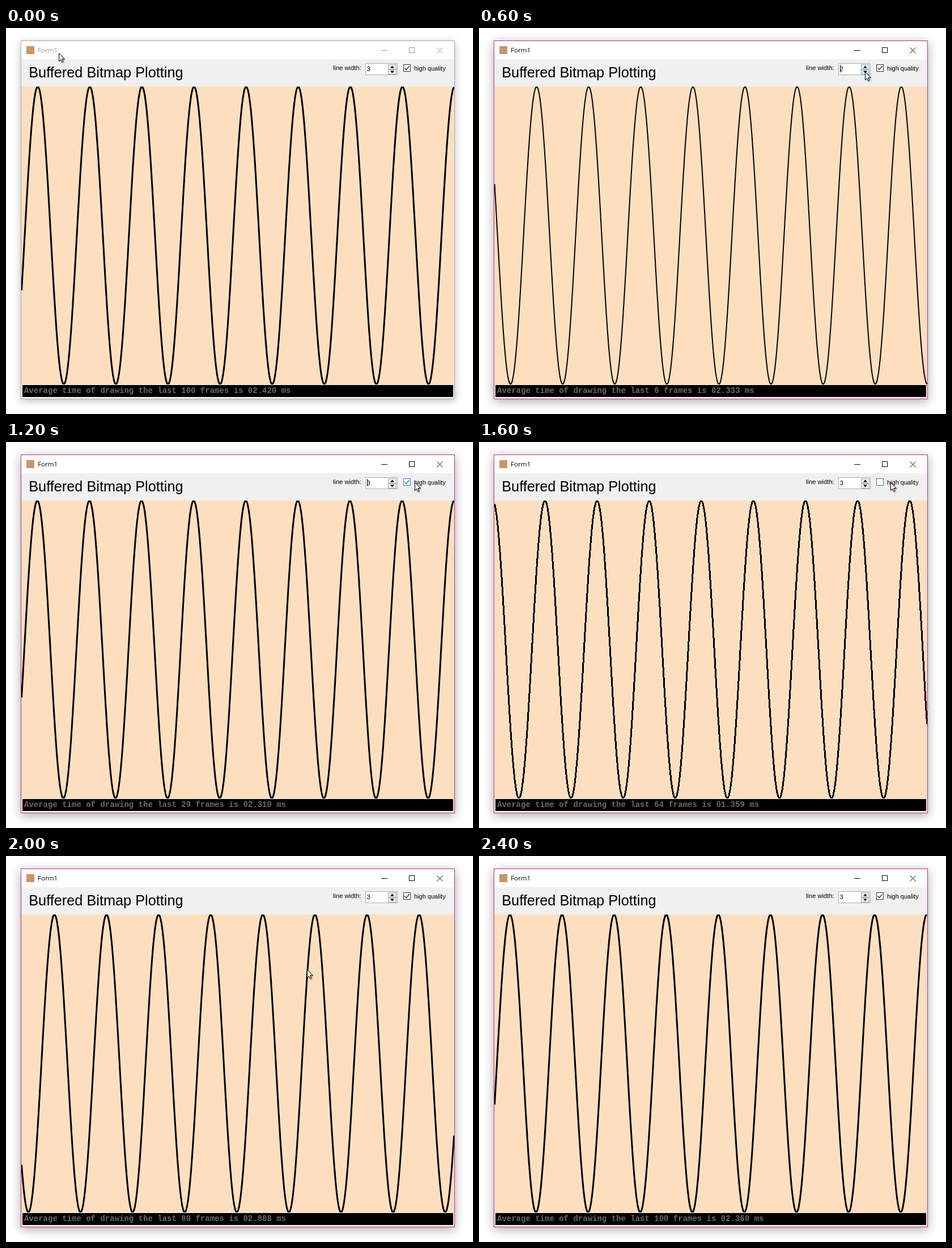
Write an HTML page with a canvas that moves like this. It is 824 px wide and 680 px high and loops after 2.5 s.

```html
<!DOCTYPE html>
<html lang="en">
<head>
<meta charset="utf-8">
<title>Buffered Bitmap Plotting</title>
<style>
html, body { margin: 0; width: 824px; height: 680px; overflow: hidden; background: #fff; }
canvas { display: block; }
</style>
</head>
<body>
<canvas id="stage" width="824" height="680"></canvas>
<script>
const ctx = document.getElementById('stage').getContext('2d');
const STEP = 100, STEPS = 25;
const PLOT = { x: 27, y: 103, w: 764, h: 525 };
const PERIOD = 91.93, SPEED = 7.72, FIRST_PEAK = 56, MID = 365.5, AMP = 262;
const SANS = '"Liberation Sans", Arial, sans-serif';

// Settings in force from a given step; n counts drawn frames, ms is their average time.
const phases = [
  { from: 0, width: 3, smooth: true, n: 100, ms: 2.42, drift: 0.01 },
  { from: 6, width: 2, smooth: true, n: 6, ms: 2.333, drift: 0 },
  { from: 7, width: 1, smooth: true, n: 10, ms: 2.2, drift: 0.012 },
  { from: 9, width: 2, smooth: true, n: 8, ms: 2.25, drift: 0.02 },
  { from: 11, width: 3, smooth: true, n: 4, ms: 2.25, drift: 0.06 },
  { from: 14, width: 3, smooth: false, n: 14, ms: 1.429, drift: -0.035 },
  { from: 17, width: 3, smooth: true, n: 5, ms: 3.284, drift: -0.132 }
];
const RATE = 25;

// Pointer path: step, x, y
const path = [
  [0, 93, 44], [2, 408, 247], [5, 674, 84], [6, 681, 77], [8, 681, 77],
  [9, 682, 67], [11, 682, 67], [12, 721, 71], [16, 726, 71], [17, 726, 71],
  [20, 531, 200], [21, 470, 240]
];

function rect(x, y, w, h, fill, edge) {
  ctx.fillStyle = fill;
  ctx.fillRect(x, y, w, h);
  if (edge) {
    ctx.strokeStyle = edge;
    ctx.lineWidth = 1;
    ctx.strokeRect(x + 0.5, y + 0.5, w - 1, h - 1);
  }
}

function text(str, x, y, font, color) {
  ctx.font = font;
  ctx.fillStyle = color;
  ctx.fillText(str, x, y);
}

function trace(points, close) {
  ctx.beginPath();
  points.forEach(([x, y]) => ctx.lineTo(x, y));
  if (close) ctx.closePath();
}

function line(points, color, width = 1) {
  trace(points);
  ctx.strokeStyle = color;
  ctx.lineWidth = width;
  ctx.stroke();
}

function drawWindow(active) {
  ctx.save();
  ctx.shadowColor = active ? 'rgba(0,0,0,.34)' : 'rgba(0,0,0,.26)';
  ctx.shadowBlur = active ? 17 : 13;
  ctx.shadowOffsetY = active ? 4 : 3;
  rect(26, 22, 766, 632, '#fff');
  ctx.restore();
  rect(26, 22, 766, 632, '#fff', active ? '#cb2a85' : '#aaa');
  rect(27, 55, 764, 598, '#f0f0f0');

  const ink = active ? '#000' : '#999';
  rect(36, 32, 14, 14, '#c99468');
  text('Form1', 56, 43, '11.6px "Open Sans", "Noto Sans", sans-serif', ink);
  rect(662, 39, 11, 1, ink);
  ctx.strokeStyle = ink;
  ctx.strokeRect(711.5, 34.5, 9, 9);
  line([[760.5, 34.5], [770.5, 44.5]], ink);
  line([[770.5, 34.5], [760.5, 44.5]], ink);
}

function drawSpinButton(y, dir, hot) {
  rect(674, y, 15, 9, hot ? '#cfe6fa' : '#ededed', hot ? '#7eb4ea' : '#acacac');
  const mid = y + 4.5;
  trace([[678, mid + 2 * dir], [685, mid + 2 * dir], [681.5, mid - 2 * dir]], true);
  ctx.fillStyle = '#000';
  ctx.fill();
}

function drawControls(step, phase) {
  text('Buffered Bitmap Plotting', 40.2, 87, '25.3px ' + SANS, '#000');
  text('line width:', 577, 74, '11.2px ' + SANS, '#000');
  rect(634, 62, 57, 21, '#fff', '#abadb3');
  text(phase.width, 636.5, 75.5, '11.2px ' + SANS, '#000');
  if (step >= 6 && step <= 12) rect(637, 65, 1, 13, '#000');
  drawSpinButton(64, 1, step >= 9 && step <= 11);
  drawSpinButton(73, -1, step >= 6 && step <= 8);

  const box = step >= 12 && step <= 17 ? '#2a7fce' : '#333';
  rect(701, 64, 13, 13, '#fff', box);
  if (phase.smooth) line([[703.3, 70.3], [706.3, 73.5], [711.7, 67.3]], box, 1.3);
  text('high quality', 720, 75, '11px ' + SANS, '#000');
}

function drawWave(step, phase) {
  const peak = FIRST_PEAK - SPEED * step;
  const wave = x => MID - AMP * Math.cos(2 * Math.PI * (x - peak) / PERIOD);
  const points = [];
  for (let x = PLOT.x; x < PLOT.x + PLOT.w; x++) points.push([x + 0.5, wave(x + 0.5)]);

  ctx.save();
  ctx.beginPath();
  ctx.rect(PLOT.x, PLOT.y, PLOT.w, PLOT.h);
  ctx.clip();
  rect(PLOT.x, PLOT.y, PLOT.w, PLOT.h, '#fddfc0');
  ctx.lineJoin = 'round';
  if (phase.smooth) line(points, '#000', phase.width);
  else jaggedLine(points, phase.width);
  ctx.restore();
}

// Whole-pixel line without smoothing
function jaggedLine(points, width) {
  const half = (width - 1) / 2;
  ctx.fillStyle = '#000';
  for (let i = 1; i < points.length; i++) {
    const [x0, y0] = points[i - 1], [x1, y1] = points[i];
    const dx = x1 - x0, dy = y1 - y0;
    const steep = Math.abs(dy) > Math.abs(dx);
    const count = Math.max(1, Math.ceil(Math.max(Math.abs(dx), Math.abs(dy))));
    for (let k = 0; k <= count; k++) {
      const x = Math.floor(x0 + dx * k / count), y = Math.floor(y0 + dy * k / count);
      if (steep) ctx.fillRect(x - half, y, width, 1);
      else ctx.fillRect(x, y - half, 1, width);
    }
  }
}

function drawStatus(step, phase) {
  const age = step - phase.from;
  const count = Math.min(100, phase.n + RATE * age);
  const ms = (phase.ms + phase.drift * age).toFixed(3).padStart(6, '0');
  rect(29, 629, 760, 21, '#000');
  text(`Average time of drawing the last ${count} frames is ${ms} ms`, 32, 643,
    'bold 14px "Liberation Mono", "Courier New", monospace', '#696969');
}

function drawPointer(step) {
  const next = path.findIndex(p => p[0] >= step);
  if (next < 0) return;
  const b = path[next], a = path[Math.max(0, next - 1)];
  const f = b[0] > a[0] ? (step - a[0]) / (b[0] - a[0]) : 0;
  ctx.save();
  ctx.translate(Math.round(a[1] + (b[1] - a[1]) * f) + 0.5, Math.round(a[2] + (b[2] - a[2]) * f) + 0.5);
  trace([[0, 0], [0, 14], [3, 11], [5.3, 16], [7.4, 15], [5.2, 10], [9.8, 10]], true);
  ctx.shadowColor = 'rgba(0,0,0,.35)';
  ctx.shadowBlur = 3;
  ctx.shadowOffsetX = ctx.shadowOffsetY = 2;
  ctx.fillStyle = '#fff';
  ctx.fill();
  ctx.shadowColor = 'transparent';
  ctx.strokeStyle = '#000';
  ctx.lineWidth = 1;
  ctx.stroke();
  ctx.restore();
}

function draw(step) {
  const phase = phases.filter(p => p.from <= step).pop();
  rect(0, 0, 824, 680, '#fff');
  drawWindow(step >= 6);
  drawControls(step, phase);
  drawWave(step, phase);
  drawStatus(step, phase);
  drawPointer(step);
}

let shown = -1;
const start = performance.now();
function tick() {
  const step = Math.floor((performance.now() - start) / STEP) % STEPS;
  if (step !== shown) draw(shown = step);
  requestAnimationFrame(tick);
}
tick();
</script>
</body>
</html>
```
